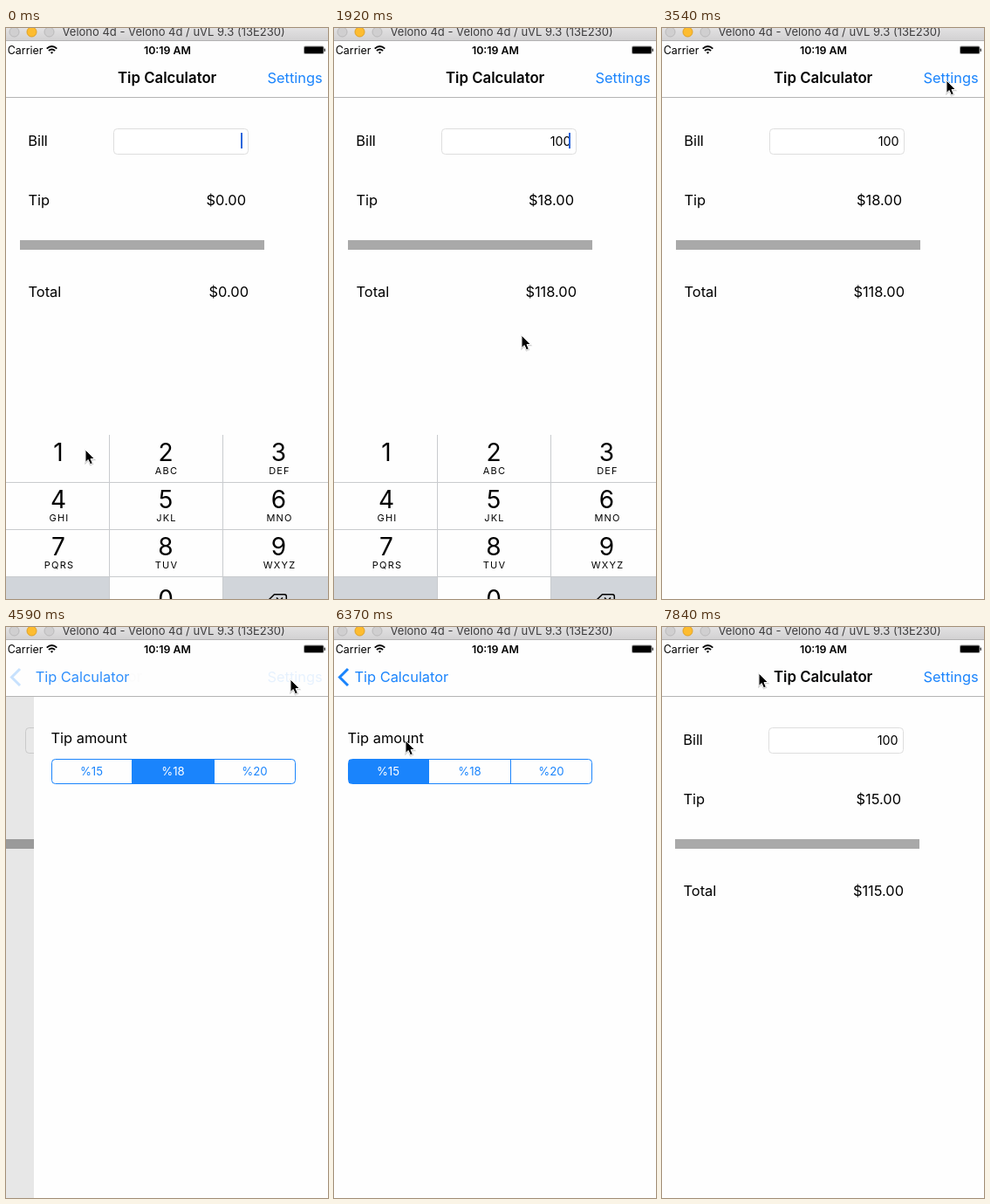
An HTML page that plays this animation: 369x654 px, repeating every 7.99 s.

```html
<!DOCTYPE html>
<html lang="en">
<head>
<meta charset="utf-8">
<title>Tip Calculator</title>
<style>
  html, body { margin: 0; width: 100%; height: 100%; overflow: hidden; background: #fefefe; }
  svg { display: block; width: 369px; height: 654px; font: 16.4px Inter, Roboto, sans-serif; }
  .blue { fill: #1a84fc; }
  .bold { font-weight: 600; }
  .end { text-anchor: end; }
  .mid { text-anchor: middle; }
  .num { font-size: 28px; }
  .abc { font-size: 11px; letter-spacing: 1.2px; }
  .small { font-size: 12.4px; }
  .seg { font-size: 13.2px; }
</style>
</head>
<body>
<svg viewBox="0 0 369 654">
  <rect width="369" height="654" fill="#fefefe"/>

  <g id="bill">
    <text x="25.2" y="135">Bill</text>
    <rect x="123.5" y="115.5" width="154" height="29" rx="4" fill="#fff" stroke="#dedede"/>
    <text id="amount" class="end" x="271.5" y="134.5" font-size="14.3"></text>
    <rect id="caret" x="269" y="120" width="2" height="18" fill="#2b66dc"/>
    <text x="25.5" y="203">Tip</text>
    <text id="tip" class="end" x="275" y="203"></text>
    <rect x="16" y="243" width="280" height="11" fill="#a9a9a9"/>
    <text x="25.5" y="308">Total</text>
    <text id="total" class="end" x="278" y="308"></text>
  </g>
  <g id="pad"></g>
  <rect id="dim" y="80" width="369" height="574"/>

  <g id="options">
    <rect x="-4" y="80" width="380" height="574" fill="#fefefe"/>
    <text x="15.5" y="133">Tip amount</text>
    <g id="segments"></g>
    <path d="M108.500 152V179M202.500 152V179" stroke="#1a84fc"/>
    <rect x="16.5" y="151.5" width="279" height="28" rx="4" fill="none" stroke="#1a84fc"/>
  </g>

  <rect y="15" width="369" height="64" fill="#fefefe"/>
  <rect y="79" width="369" height="1" fill="#b4b4b4"/>
  <g id="back">
    <path id="chevron" d="M16 48L6.500 57.500L16 67" fill="none" stroke="#1a84fc" stroke-width="3"/>
    <text id="backText" class="blue" x="23.5" y="63">Tip Calculator</text>
  </g>
  <text id="heading" class="bold" x="128" y="63" font-size="16.800">Tip Calculator</text>
  <text id="settings" class="blue" x="299.5" y="63">Settings</text>

  <text class="small" x="1.8" y="29.500">Carrier</text>
  <g fill="none" stroke="#000" stroke-width="1.8">
    <path d="M46.700 23.600Q52.500 18.400 58.300 23.600M48.900 26Q52.500 22.900 56.100 26"/>
    <path d="M52.500 29.700L50.800 27.800Q52.500 26.500 54.200 27.800Z" fill="#000" stroke="none"/>
  </g>
  <text class="small bold mid" x="185" y="29.500">10:19 AM</text>
  <rect x="341" y="20.500" width="23.500" height="9.500" rx="2" fill="#9a9a9a"/>
  <rect x="342" y="21.500" width="21.500" height="7.500" rx="1"/>
  <rect x="364.500" y="23.500" width="1.500" height="3.500" rx=".7" fill="#444"/>

  <linearGradient id="chrome" x2="0" y2="1">
    <stop stop-color="#e2e1e2"/><stop offset="1" stop-color="#d2d1d2"/>
  </linearGradient>
  <rect width="369" height="14" fill="url(#chrome)"/>
  <rect y="14" width="369" height="1" fill="#b2b1b2"/>
  <g stroke-width="1">
    <circle cx="9.500" cy="4.500" r="5.500" fill="#d0cfd0" stroke="#b9b8b9"/>
    <circle cx="29.500" cy="4.500" r="5.500" fill="#fdbc30" stroke="#dfa023"/>
    <circle cx="49.500" cy="4.500" r="5.500" fill="#d0cfd0" stroke="#b9b8b9"/>
  </g>
  <text x="64.500" y="9" font-size="13" fill="#3d3c3d">Velono 4d - Velono 4d / uVL 9.3 (13E230)</text>

  <g id="cursor">
    <path d="M0 1V15.500L3.200 12.500L5.500 17.500L8.500 16.300L6.300 11.400H10.500Z" opacity=".18" stroke="#000" stroke-width="1.5"/>
    <path d="M0 0V14.500L3.200 11.500L5.500 16.800L8.300 15.600L6 10.500H10.400Z" stroke="#fff"/>
  </g>
</svg>
<script>
const $ = id => document.getElementById(id);
const LOOP = 7990, STEP = 147.96, LAST = 53;

// Keypad
const colX = [0, 119, 249, 369], colMid = [60, 183, 312.5];
const letters = ['', 'ABC', 'DEF', 'GHI', 'JKL', 'MNO', 'PQRS', 'TUV', 'WXYZ'];
const GREY = '#d1d5da';

function key(n, col, row, sub) {
  const y = 466 + row * 54;
  return `<rect id="key${n}" x="${colX[col]}" y="${y}" width="${colX[col + 1] - colX[col]}" height="54" fill="#fefefe"/>
    <text class="num mid" x="${colMid[col]}" y="${y + 30 + (n ? 0 : 6)}">${n}</text>
    <text class="abc mid" x="${colMid[col] + 1}" y="${y + 45}">${sub}</text>`;
}

$('pad').innerHTML =
  `<rect y="466" width="369" height="220" fill="${GREY}"/>` +
  letters.map((s, i) => key(i + 1, i % 3, Math.floor(i / 3), s)).join('') +
  key(0, 1, 3, '') +
  `<path d="M118.500 466V690M248.500 466V690M0 520.500H369M0 574.500H369M0 628.500H369" stroke="#c9cbce"/>
   <path d="M300 656L307.500 648.700H319Q321.300 648.700 321.300 651V661Q321.300 663.300 319 663.300H307.500ZM310 652.500L317 659.500M317 652.500L310 659.500"
     fill="none" stroke="#000" stroke-width="1.500"/>`;

// Segmented control
const segX = [17, 109, 203, 295], segMid = [62, 155.5, 249];
$('segments').innerHTML = ['%15', '%18', '%20'].map((s, i) =>
  `<rect id="seg${i}" x="${segX[i]}" y="152" width="${segX[i + 1] - segX[i]}" height="27" fill="#1a84fc"/>
   <text id="segText${i}" class="seg mid" x="${segMid[i]}" y="170">${s}</text>`).join('');

// Pointer stops: step, x, y
const path = [
  [0, 91, 483], [3, 91, 483], [5, 170, 592], [6, 207, 638], [10, 207, 638],
  [11, 205, 600], [12, 206, 455], [13, 215, 352], [19, 215, 352], [23, 318, 82],
  [24, 326, 60], [33, 326, 60], [34, 298, 70], [35, 231, 98], [36, 159, 136],
  [37, 67, 177], [41, 67, 177], [43, 82, 130], [46, 103, 53], [47, 103, 52],
  [48, 103, 52], [49, 111, 53], [LAST, 111, 53]
];

function pointer(n) {
  const k = Math.max(1, path.findIndex(p => p[0] >= n));
  const [a, ax, ay] = path[k - 1], [b, bx, by] = path[k];
  const f = (n - a) / (b - a);
  return [ax + (bx - ax) * f, ay + (by - ay) * f];
}

// Share of the settings screen that is pushed in, 0 to 1
function pushed(n) {
  const t = n * STEP / 1000;
  const decay = start => Math.exp(-9 * (t - start));
  if (n < 30) return 0;
  if (n < 50) return n > 33 ? 1 : 1 - decay(4.328);
  return decay(7.32);
}

const move = (id, x, y = 0) => $(id).setAttribute('transform', `translate(${x} ${y})`);
const fade = (id, v) => $(id).setAttribute('opacity', v);
const paint = (id, c) => $(id).setAttribute('fill', c);
const money = v => '$' + v.toFixed(2);

function draw(n) {
  const typed = n < 2 ? '' : n < 7 ? '1' : n < 11 ? '10' : '100';
  const rate = n < 40 ? 0.18 : 0.15;
  $('amount').textContent = typed;
  $('tip').textContent = money(typed * rate);
  $('total').textContent = money(typed * (1 + rate));
  fade('caret', n < 15 ? 1 : n === 15 ? 0.5 : 0);

  paint('key1', n === 1 ? GREY : '#fefefe');
  paint('key0', n === 6 || n === 8 ? GREY : '#fefefe');
  const drop = Math.min(1, Math.max(0, (n - 17) / 3));
  move('pad', 0, 190 * drop * drop * (3 - 2 * drop));

  const p = pushed(n), rest = 1 - p;
  move('bill', Math.round(-112 * p));
  fade('dim', 0.1 * p);
  move('options', p ? Math.round(369 * rest) : 400);
  fade('chevron', p ** 14);
  fade('backText', p);
  move('backText', 104 * rest);
  fade('heading', rest * rest);
  move('heading', Math.round(-104 * p * p));
  fade('settings', n === 29 ? 0.3 : rest);
  fade('back', n === 49 ? 0.3 : 1);

  const chosen = n < 40 ? 1 : 0;
  for (let i = 0; i < 3; i++) {
    fade('seg' + i, i === chosen ? 1 : i === 0 && n === 39 ? 0.15 : 0);
    paint('segText' + i, i === chosen ? '#fff' : '#1a84fc');
  }
  move('cursor', ...pointer(n));
}

let shown = -1;
function tick() {
  const t = performance.now() % LOOP;
  const n = Math.min(LAST, Math.floor((t + 12) / STEP));
  if (n !== shown) draw(shown = n);
  requestAnimationFrame(tick);
}
tick();
</script>
</body>
</html>
```
